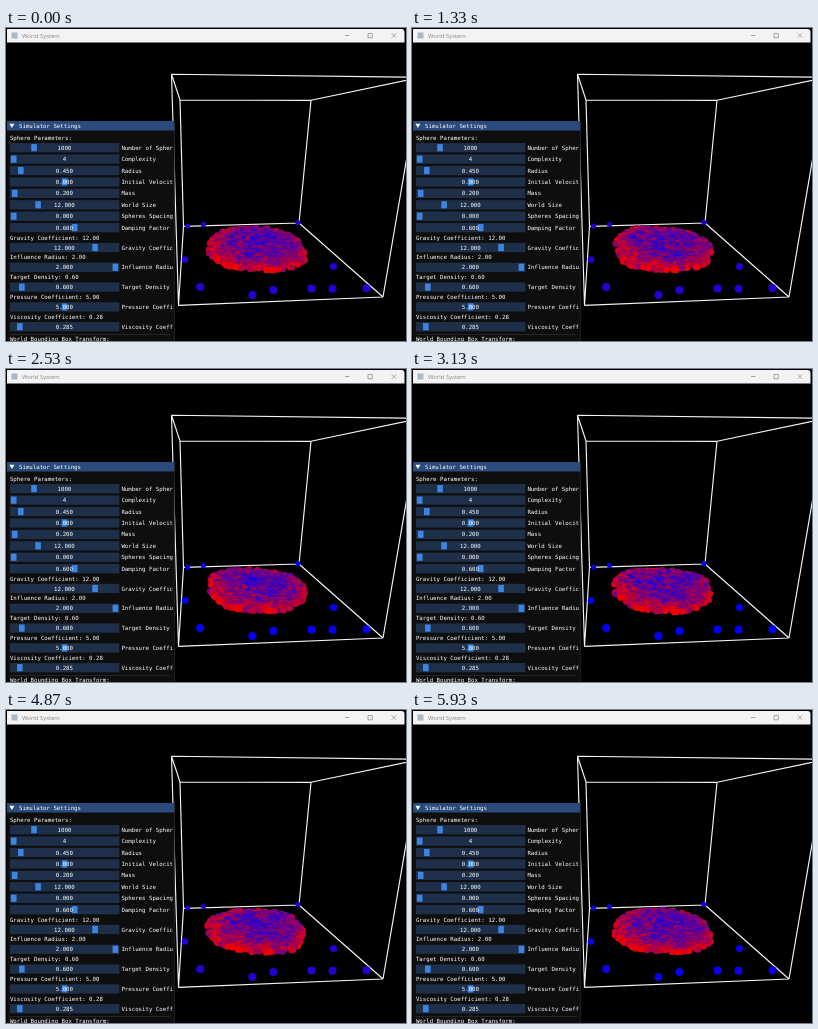
These frames come from a looping animation (400 px wide and 313 px high, 6000 ms). An HTML page with a canvas:

```html
<!DOCTYPE html>
<html lang="en">
<head>
<meta charset="utf-8">
<title>World System</title>
<style>
  html, body { margin: 0; width: 100%; height: 100%; overflow: hidden; background: #000; }
  svg, canvas { position: absolute; left: 0; top: 0; width: 400px; height: 313px; display: block; }
  .ui { font: 5.72px "DejaVu Sans Mono", monospace; fill: #fff; white-space: pre; }
  .title { font: 5.9px "Open Sans", sans-serif; fill: #858585; }
</style>
</head>
<body>
<canvas id="scene" width="400" height="313"></canvas>
<svg viewBox="0 0 400 313">
  <path d="M1 14.600V1h394.500a3 3 0 0 1 3 3v10.600z" fill="#f3f3f3"/>
  <rect x="5.500" y="4.500" width="6" height="6" fill="#a9b8c6"/>
  <text class="title" x="16" y="10">World System</text>
  <path d="M339 7.500h4.500M362 5.500h4.300v4.300h-4.300zM385.700 5.300l4.500 4.500m0-4.500l-4.500 4.500" fill="none" stroke="#858585" stroke-width=".7"/>
  <g id="panel" transform="translate(-.6 0)">
    <rect x="1.600" y="93" width="167.400" height="220" fill="#0e0e0f"/>
    <rect x="1.600" y="93" width="167.400" height="9.500" fill="#294a7a"/>
    <path d="M4 95.800h5l-2.500 4.300z" fill="#fff"/>
    <path d="M169 93v220M4 306.500h161" stroke="#34343c" stroke-width=".6"/>
  </g>
</svg>
<script>
const LOOP = 6000, STEP = LOOP / 90, TAU = Math.PI * 2;
const panel = document.getElementById('panel');
const ctx = document.getElementById('scene').getContext('2d');

function add(tag, attrs, text) {
  const el = document.createElementNS('http://www.w3.org/2000/svg', tag);
  for (const key in attrs) el.setAttribute(key, attrs[key]);
  if (text) el.textContent = text;
  panel.append(el);
}

function label(x, y, text, anchor = 'start') {
  add('text', { class: 'ui', x, y: y + 2, 'text-anchor': anchor }, text);
}

function slider(y, name, value, part) {
  add('rect', { x: 4.5, y: y - 4.65, width: 109.5, height: 9.3, fill: '#1d2f49' });
  add('rect', { x: 5.5 + part * 101.7, y: y - 3.6, width: 5.6, height: 7.2, fill: '#3d85e0' });
  label(59, y, value, 'middle');
  label(116, y, name.slice(0, 15));
}

// name, value, position within its range
const world = [
  ['Number of Spheres', '1000', .2],
  ['Complexity', '4', 0],
  ['Radius', '0.450', .07],
  ['Initial Velocity', '0.000', .5],
  ['Mass', '0.200', .01],
  ['World Size', '12.000', .24],
  ['Spheres Spacing', '0.000', 0],
  ['Damping Factor', '0.600', .6]
];
const forces = [
  ['Gravity Coefficient', '12.000', .8],
  ['Influence Radius', '2.000', 1],
  ['Target Density', '0.600', .08],
  ['Pressure Coefficient', '5.000', .5],
  ['Viscosity Coefficient', '0.285', .06]
];

label(13.6, 97.7, 'Simulator Settings');
label(4.5, 109.5, 'Sphere Parameters:');
world.forEach((row, i) => slider(119.7 + i * 11.42, ...row));
forces.forEach((row, i) => {
  const y = 209.6 + i * 19.8;
  label(4.5, y, `${row[0]}: ${row[1].slice(0, -1)}`);
  slider(y + 9.9, ...row);
});
label(4.5, 311, 'World Bounding Box Transform:');

const near = [[165.5, 46.3], [414.5, 49.3], [377, 269], [172.5, 277.4]];
const far = [[174, 72], [305, 72.3], [293, 195], [177.5, 198.4]];
const strays = [
  [181.5, 198], [197.5, 196.5], [292, 194.5], [179, 231.5], [327.5, 238.5], [194.2, 259],
  [246.4, 267], [267.3, 262], [305.4, 260.5], [326.5, 260.8], [360.5, 260.3]
];

let seed = 41;
const rand = () => (seed = seed * 16807 % 2147483647) / 2147483647;

const fluid = Array.from({ length: 1000 }, () => ({
  angle: rand() * TAU,
  dist: rand() ** .47,
  tint: rand() - .5,
  phase: rand() * TAU,
  cycles: 2 + Math.floor(rand() * 5)
}));

// Glow of the resting spheres: time, share of red
const glow = [[0, .15], [1330, .15], [1930, .03], [3130, .01], [4130, .23], [5930, .05], [LOOP, .15]];

function glowAt(t) {
  const i = glow.findIndex(key => key[0] > t);
  const [t0, a] = glow[i - 1], [t1, b] = glow[i];
  return a + (b - a) * (t - t0) / (t1 - t0);
}

const rounded = v => Math.sign(v) * Math.abs(v) ** .84;

function ball(x, y, r, red) {
  const k = Math.max(0, Math.min(1, red));
  ctx.fillStyle = `rgb(${240 * k},0,${250 * (1 - k)})`;
  ctx.beginPath();
  ctx.arc(x, y, r, 0, TAU);
  ctx.fill();
}

function drawRoom() {
  ctx.strokeStyle = '#f4f4f4';
  ctx.lineWidth = 1.15;
  ctx.beginPath();
  near.forEach((p, i) => {
    const next = (i + 1) % 4;
    for (const [a, b] of [[p, near[next]], [far[i], far[next]], [p, far[i]]]) {
      ctx.moveTo(...a);
      ctx.lineTo(...b);
    }
  });
  ctx.stroke();
}

function place(p, turn) {
  const swing = turn * p.cycles + p.phase;
  const rim = 1 + .03 * Math.sin(3 * p.angle + turn) + .02 * Math.sin(7 * p.angle - turn * 2);
  const nx = rounded(Math.cos(p.angle)) * p.dist * rim;
  const ny = rounded(Math.sin(p.angle)) * p.dist * rim;
  const patch = Math.sin(nx * 7 + turn * 2) * Math.sin(ny * 4 + nx * 3 - turn);
  const edge = .36 * p.dist ** 4 + .14 * ny - .08 * nx;
  return {
    x: 250.5 + nx * 47.5 + Math.sin(swing),
    y: 221.5 + ny * 20.5 + nx * 2.8 + Math.cos(swing) * .6,
    red: .42 + edge + .08 * patch + .5 * p.tint + .12 * Math.sin(swing)
  };
}

function draw(t) {
  ctx.clearRect(0, 0, 400, 313);
  drawRoom();
  const red = glowAt(t);
  for (const [x, y] of strays) ball(x, y, Math.min(4, 2.6 + Math.max(0, y - 198) * .023), red);
  fluid.map(p => place(p, t / LOOP * TAU))
    .sort((a, b) => a.y - b.y)
    .forEach(p => ball(p.x, p.y, 3.1, p.red));
}

function tick() {
  // The small lead keeps steps on hundredths of a second
  const step = Math.floor((performance.now() + 4) % LOOP / STEP);
  draw(step * STEP);
  requestAnimationFrame(tick);
}
tick();
</script>
</body>
</html>
```
